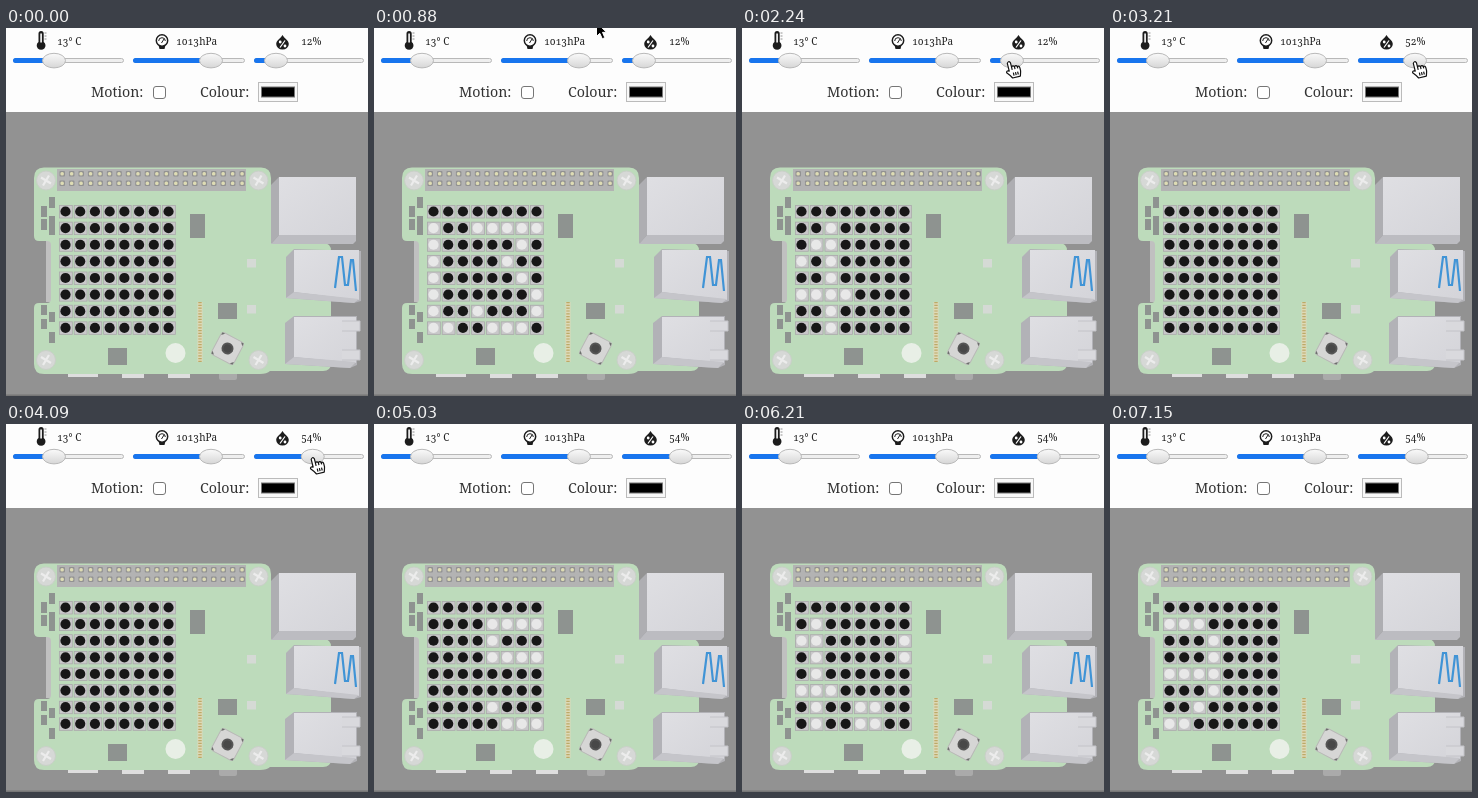
Animation of 362x368 px, one loop 7180 ms. Source, as an HTML page:

```html
<!DOCTYPE html>
<html lang="en">
<head>
<meta charset="utf-8">
<title>Sensor board emulator</title>
<style>
html, body { margin: 0; width: 100%; height: 100%; overflow: hidden; background: #929292; }
svg { display: block; }
text { font: 10px "Noto Serif", serif; font-variant-numeric: oldstyle-nums; fill: #222; }
.label { font-size: 14.2px; fill: #333; }
</style>
</head>
<body>
<svg width="362" height="368" viewBox="0 0 362 368">
  <defs>
    <linearGradient id="knob" x2="0" y2="1"><stop stop-color="#fafafa"/><stop offset="1" stop-color="#d6d6d6"/></linearGradient>
    <linearGradient id="metal" x2="1" y2="1"><stop stop-color="#dfdfe3"/><stop offset="1" stop-color="#d4d4d9"/></linearGradient>
    <g id="screw">
      <circle r="9.5" fill="#d6d8d6" stroke="#c9d0c8"/>
      <path d="M-5-3L5 3M3-5L-3 5" stroke="#ececec" stroke-width="2.2"/>
    </g>
  </defs>

  <!-- control panel -->
  <rect width="362" height="84" fill="#fdfdfd"/>
  <g id="sliders"></g>
  <g fill="#1c1c1c">
    <path d="M32.5 5.5a2.6 2.6 0 0 1 5.2 0v8.4a4.4 4.4 0 1 1-5.2 0z"/>
    <path d="M35.1 5.500v9" stroke="#fff" stroke-width="1.6"/>
    <path d="M38.500 5h2M38.500 8h2M38.500 11h2" stroke="#777" stroke-width=".8"/>
    <path d="M152.500 17h7l-1 4h-5z"/>
    <circle cx="156" cy="12.500" r="5.700" fill="#fff" stroke="#1c1c1c" stroke-width="1.500"/>
    <path d="M152.700 13a3.300 3.300 0 0 1 6.600 0M155.500 15l2.500-4" fill="none" stroke="#1c1c1c"/>
    <path d="M276.500 7c2 3.500 6.300 5.500 6.300 9a6.300 5.600 0 0 1-12.600 0c0-3.500 4.300-5.500 6.300-9z"/>
    <path d="M279 12.500l-5 7" stroke="#fff" stroke-width="1.200"/>
    <circle cx="274.200" cy="14" r="1.400" fill="#fff"/><circle cx="279" cy="18" r="1.400" fill="#fff"/>
  </g>
  <text x="51" y="17">13° C</text>
  <text x="170" y="17">1013hPa</text>
  <text x="295" y="17" id="humidity">12%</text>
  <text class="label" x="85" y="69">Motion:</text>
  <text class="label" x="194" y="69">Colour:</text>
  <rect x="147.5" y="58.5" width="12" height="12" rx="2.5" fill="#fff" stroke="#767676"/>
  <rect x="252.5" y="54.5" width="39" height="19" fill="#f8f8f8" stroke="#bbb"/>
  <rect x="255.5" y="59" width="33" height="10" stroke="#777"/>

  <!-- circuit board -->
  <rect y="366.5" width="362" height="2" fill="#777"/>
  <g fill="#dedede">
    <rect x="62" y="343" width="30" height="6"/>
    <rect x="116" y="343" width="22" height="7"/>
    <rect x="162" y="343" width="22" height="7"/>
    <rect x="213" y="343" width="18" height="9" rx="2" fill="#aaa"/>
    <rect x="40" y="213" width="8" height="61" fill="#c0c0c0"/>
  </g>
  <path fill="#bddbbb" d="M38 139.500H255Q265 139.500 265 150V215H317Q325 215 325 223V335Q325 343 317 343H264Q261 346 254 346H38Q28 346 28 336V280Q28 275 33 275H41Q45 275 45 271V217Q45 213 41 213H33Q28 213 28 208V150Q28 139.500 38 139.500Z"/>
  <use href="#screw" x="40" y="152.500"/><use href="#screw" x="252.500" y="152.500"/>
  <use href="#screw" x="40" y="332"/><use href="#screw" x="252.500" y="332"/>
  <rect x="51" y="141" width="189" height="22" fill="#b3b3b3"/>
  <g id="pins"></g>
  <g id="chips" fill="#8e9390"></g>
  <g id="leds"></g>
  <path d="M194 274V334" stroke="#ddd9b8" stroke-width="5"/>
  <path d="M194 274V334" stroke="#bda966" stroke-width="3.400" stroke-dasharray="1.200 1.600"/>
  <circle cx="169.500" cy="325" r="10" fill="#e8efe6"/>
  <g transform="translate(221.500 320.500) rotate(28)">
    <rect x="-12.500" y="-12.500" width="25" height="25" rx="3" fill="#d6d6d5" stroke="#b9b9b7"/>
    <path d="M-12-9v-3h3zM9-12h3v3zM12 9v3h-3zM-9 12h-3v-3z" fill="#6d706d"/>
    <circle r="6" fill="#555"/><circle r="4" fill="#484848"/>
  </g>

  <!-- ports -->
  <path d="M273 149H350V207H273L265 216V157Z" fill="#aeaeb2"/>
  <path d="M265 216L273 207H350V213L347 216Z" fill="#bcbcc1"/>
  <rect x="273" y="149" width="77" height="58" fill="url(#metal)"/>
  <path d="M288 221L355 223V273L348 275L280 270V229Z" fill="#b2b2b7"/>
  <path d="M288 222H353V272L288 264Z" fill="url(#metal)"/>
  <path d="M288 264L280 270L348 275L353 271Z" fill="#c5c5ca"/>
  <path d="M329 260L333 229H336L339 257H342L345 232H347L350 263" fill="none" stroke="#4094d6" stroke-width="2.200"/>
  <path d="M288 288H351V337L344 340L279 336V295Z" fill="#b2b2b7"/>
  <path d="M288 289H350V335L288 329Z" fill="url(#metal)"/>
  <path d="M288 329L279 336L344 340L350 334Z" fill="#c5c5ca"/>
  <path d="M336 293H354V303H336M336 322H354V332H336" fill="#d9d9dd" stroke="#c3c3c8"/>

  <!-- pointer -->
  <g id="cursor" stroke-linejoin="round">
    <path id="arrow" stroke="#fff" d="M0 0V14L3.300 11L5.800 16.500L8.300 15.300L6 10H10Z"/>
    <g id="hand" fill="#fff" stroke="#111" stroke-width="1.200" transform="rotate(-14)">
      <path d="M-1.600 1.500Q0-1 1.600 1.500V6Q3.500 4.500 4.500 6.500Q6.500 5 7.300 7Q9.500 6.500 9.500 9V12Q9 14 8 17H0Q-1.500 14-4.500 10.500Q-4.500 8-1.600 9.500Z"/>
      <path d="M1.600 6V9M4.500 6.500V9M7.300 7V9M2 12V15M4.200 12V15M6.400 12V15"/>
    </g>
  </g>
</svg>
<script>
const $ = id => document.getElementById(id);
const LOOP = 7180, FRAME = 30, LAST = 7140, STEP = 105;

function add(parent, tag, attrs) {
  const el = document.createElementNS("http://www.w3.org/2000/svg", tag);
  for (const key in attrs) el.setAttribute(key, attrs[key]);
  return parent.appendChild(el);
}
const rect = (parent, x, y, width, height, fill, rx = 0) =>
  add(parent, "rect", { x, y, width, height, rx, ...(fill && { fill }) });

function slider(x, width, knobX) {
  const g = $("sliders");
  add(g, "rect", { x: x + .5, y: 30.5, width: width - 1, height: 4, rx: 2, fill: "#efefef", stroke: "#b8b8b8" });
  const fill = rect(g, x, 30, knobX - x, 5, "#1875ee", 2.5);
  const knob = add(g, "ellipse", { cx: knobX, cy: 32.6, rx: 11.5, ry: 7.3, fill: "url(#knob)", stroke: "#b9b9b9" });
  return v => { fill.setAttribute("width", v - x); knob.setAttribute("cx", v); };
}
slider(7, 111, 48);
slider(127, 112, 205);
const moveHumidity = slider(248, 110, 270);

for (let i = 0; i < 40; i++) {
  const x = 56 + (i % 20) * 9.47, y = i < 20 ? 145.5 : 155;
  rect($("pins"), x - 2.5, y - 2.5, 5.5, 5.5, "#929292", 1);
  rect($("pins"), x - 1.6, y - 1.6, 3.5, 3.5, "#dedcb4", 1.5);
}
for (const [x, y, w, h] of [
  [184, 186, 15, 24], [212, 275, 19, 16], [102, 320, 19, 17],
  [43, 169, 6, 11], [35, 178, 6, 11], [35, 191, 6, 11], [43, 188, 6, 19],
  [35, 277, 6, 10], [43, 284, 6, 10], [35, 291, 6, 10], [43, 304, 6, 11]
]) rect($("chips"), x, y, w, h);
for (const y of [231, 277]) rect($("chips"), 241, y, 9, 8.5, "#d5dad5");

const leds = Array.from({ length: 64 }, (_, i) => {
  const cx = 59.5 + (i % 8) * 14.72, cy = 183.5 + (i >> 3) * 16.62;
  add($("leds"), "rect", { x: cx - 6, y: cy - 6, width: 12.8, height: 12.5, fill: "#c9c8ca", stroke: "#aaa8ab", "stroke-width": .8 });
  return add($("leds"), "circle", { cx, cy, r: 5.1 });
});

// Seven rows per glyph; the matrix's top row stays dark.
const GLYPHS = {
  1: "010 110 010 010 010 010 111",
  3: "11111 00010 00100 00010 00001 10001 01110",
  4: "00010 00110 01010 10010 11111 00010 00010",
  5: "11111 10000 11110 00001 00001 10001 01110",
  9: "01110 10001 10001 01111 00001 00010 01100",
  ".": "00 00 00 00 00 11 11"
};
const blank = "0".repeat(8);
const message = (text, start) => ({
  start,
  rows: Array.from({ length: 8 }, (_, r) => r
    ? blank + [...text].map(c => GLYPHS[c].split(" ")[r - 1]).join("0") + blank
    : "")
});
const messages = [message("13.4", -97), message("54.9", 4522)];

// Linear interpolation through [time, value] points.
function track(points, t) {
  const i = points.findIndex(p => p[0] > t);
  if (i < 0) return points[points.length - 1][1];
  if (!i) return points[0][1];
  const [t0, a] = points[i - 1], [t1, b] = points[i];
  return a + (b - a) * (t - t0) / (t1 - t0);
}
const humidity = [[2960, 12], [3200, 52], [3400, 52], [3550, 54]];
const pointerX = [[700, 222.5], [880, 222.5], [1440, 266.5]];
const pointerY = [[700, -17], [880, -5], [1440, 33.5]];
const show = (id, visible) => $(id).style.display = visible ? "" : "none";

function draw(t) {
  const { rows, start } = messages[t < 4500 ? 0 : 1];
  const shift = Math.floor((t - start) / STEP);
  leds.forEach((led, i) =>
    led.setAttribute("fill", rows[i >> 3][shift + i % 8] === "1" ? "#e8e8e8" : "#171717"));

  const value = Math.round(track(humidity, t));
  $("humidity").textContent = value + "%";
  moveHumidity(259.5 + value * .875);

  const x = track(pointerX, t) + (value - 12) * .95, y = track(pointerY, t);
  const overKnob = t >= 1380;
  $("cursor").setAttribute("transform", `translate(${x} ${y})`);
  show("cursor", t > 700 && t < 4600);
  show("arrow", !overKnob);
  show("hand", overKnob);
}

const began = performance.now();
function tick() {
  const t = (performance.now() - began) % LOOP;
  draw(Math.min(LAST, Math.floor(t / FRAME) * FRAME));
  requestAnimationFrame(tick);
}
tick();
</script>
</body>
</html>
```
